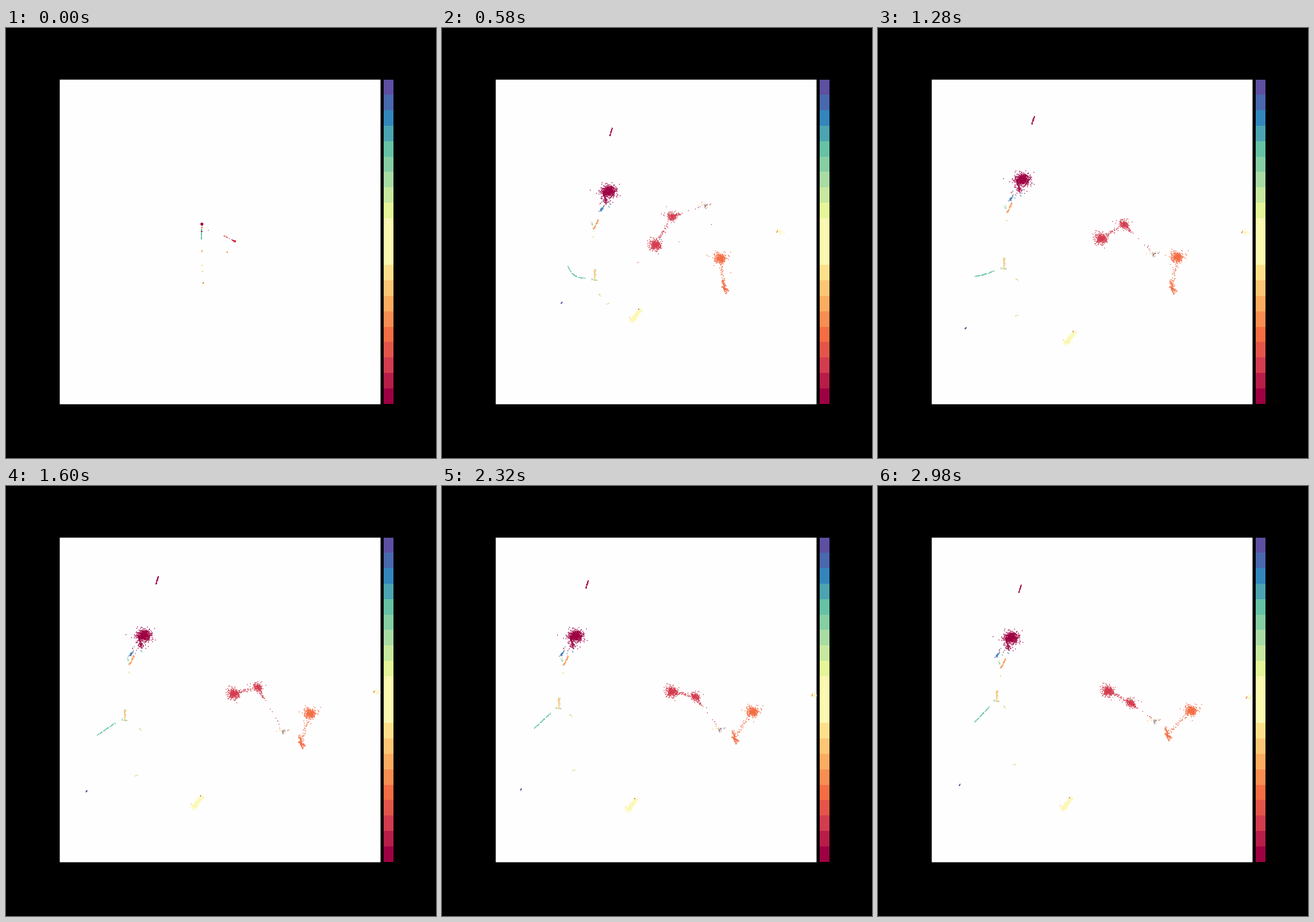
A matplotlib script for the animation above (3.03 s loop, 748x748 px).

```python
import numpy as np
import matplotlib as mpl
import matplotlib.pyplot as plt
from matplotlib.animation import FuncAnimation
from matplotlib.colors import ListedColormap

SIZE, DPI = 748, 100
LOOP, TICK, STEP = 3030, 10, 20
DOT = 1.4  # pixels
TIMES = np.array([0, 580, 1600, 2980], float)  # seed, burst, turn, rest
GROW = np.array([0.08, 1, 1, 1])[:, None, None]
TENSION = 0.6

palette = mpl.colormaps["Spectral"](np.linspace(0, 1, 21))
palette[9:12, :3] = np.array([251, 248, 176]) / 255
CRIMSON, RED, ORANGE, AMBER, SAND, LEMON = 0, 2, 4, 6, 7, 10
LIME, GREEN, TEAL, BLUE, NAVY = 13, 14, 16, 18, 20

rng = np.random.default_rng(11)
clouds, shades = [], []


def path(*stops):
    return np.array(stops, float)


def add(points, colors):
    clouds.append(points)
    shades.append(rng.choice(colors, points.shape[1]))


def blob(colors, n, spread, centre):
    add(centre[:, None] + GROW * rng.normal(0, 1, (n, 2)) * spread, colors)


def ball(color, n, spread, centre):
    """A dense blob with a thin halo."""
    blob([color], n, spread, centre)
    blob([color], n // 9, np.multiply(spread, 1.7), centre)


def strand(colors, n, spread, a, b, bow=0):
    """Points strewn along a moving line, bent sideways by bow after the burst."""
    t = rng.random((n, 1))
    chord = (b - a)[:, None]
    normal = chord[..., ::-1] * [-1, 1] / (np.linalg.norm(chord, axis=2)[..., None] + 1e-6)
    bend = bow * (TIMES == TIMES[1])[:, None, None] * 4 * t * (1 - t)
    noise = GROW * rng.normal(0, spread, (n, 2))
    add(a[:, None] + chord * t + normal * bend + noise, colors)


def stick(colors, n, spread, centre, half):
    """A strand of fixed direction."""
    reach = GROW[:, 0] * half
    strand(colors, n, spread, centre - reach, centre + reach)


# dark crimson group with the strands hanging below it
crimson = path((341, 341), (290, 284), (240, 260), (232, 264))
streak = path((340, 340), (294, 181), (263, 164), (247, 179))
blue = path((340, 351), (278, 315), (218, 292), (208, 294))
amber = path((341, 347), (268, 342), (219, 303), (218, 309))
ball(CRIMSON, 520, (6, 4.6), crimson)
stick([CRIMSON], 80, 2, crimson + GROW[:, 0] * (-7, 12), (3, 9))
stick([CRIMSON], 34, 0.3, streak, (-2, 6.5))
stick([BLUE, BLUE + 1], 26, 0.9, blue, (-4, 5))
blob([CRIMSON, RED, ORANGE, BLUE, BLUE + 1], 14, (5, 4), (crimson + blue) / 2 + [0, 8])
stick([AMBER - 1, AMBER], 38, 0.7, amber, (-4, 9))
stick([GREEN, TEAL], 11, 0.6, amber + GROW[:, 0] * (-6, 1), (3, 7))
blob([SAND], 2, 0.5, amber + GROW[:, 0] * (-5, 21))

# teal arc that straightens, with its upright post
post = path((341, 388), (266, 429), (207, 398), (207, 365))
strand([TEAL], 48, 0.3,
       path((340, 350), (219, 413), (158, 434), (168, 411)),
       path((340, 368), (252, 435), (192, 411), (195, 383)), bow=8)
stick([GREEN, TEAL, SAND], 14, 0.7, post + GROW[:, 0] * (-1, 9), (4.5, 0.5))
stick([AMBER, SAND, SAND, LIME], 40, 0.9, post, (0, 9))

# small drifters
stick([LIME, SAND], 6, 0.4, path((341, 413), (275, 465), (234, 424), (221, 385)), (1.5, 2))
blob([SAND, LIME], 5, (1.4, 0.7), path((342, 423), (289, 479), (228, 503), (238, 484)))
stick([NAVY], 9, 0.3, path((340, 366), (208, 478), (140, 531), (142, 520)), (-1.5, 2))

# pale yellow bar
bar_mid = path((343, 444), (338, 499), (334, 549), (329, 552))
stick([LEMON], 170, 1.8, bar_mid, (7, -8))
blob([LEMON], 85, (3, 2), bar_mid + GROW[:, 0] * (-6, 8))
blob([CRIMSON], 1, 0.3, bar_mid + GROW[:, 0] * (4, -9))
blob([AMBER], 1, 0.3, bar_mid + GROW[:, 0] * (-12, 5))

# red pair, linked to the mixed specks that swing down
red_a = path((398, 371), (371, 378), (396, 362), (400, 357))
red_b = path((398, 371), (400, 328), (438, 350), (439, 377))
mixed = path((380, 362), (458, 309), (482, 427), (481, 409))
ball(RED, 310, (4.5, 4.3), red_a)
ball(RED, 150, (3.9, 3.6), red_b)
strand([RED], 50, 1.8, red_a, red_b)
strand([RED], 28, 1.2, red_b, 0.75 * red_b + 0.25 * mixed)
strand([RED, CRIMSON], 6, 0.7, red_b, mixed)
blob([TEAL, BLUE, RED], 8, (2.5, 2.5), 0.8 * red_a + 0.2 * red_b)
blob([GREEN, TEAL], 5, (4, 2), red_b + GROW[:, 0] * (-1, -6))
blob([BLUE, BLUE + 1, NAVY], 12, (3, 2.4), mixed)
blob([AMBER, SAND, ORANGE, TEAL], 18, (4.2, 3), mixed)

# orange ball, leg and foot
sun = path((398, 371), (484, 401), (529, 396), (545, 391))
foot = path((398, 371), (491, 450), (513, 445), (503, 431))
ball(ORANGE, 280, (4.5, 4.2), sun)
strand([ORANGE], 45, 1.6, sun, foot)
stick([ORANGE], 60, 1.2, foot, (2.5, 11))
stick([ORANGE], 38, 0.9, foot + GROW[:, 0] * (1, 3), (6, 3))

# pale cluster sliding into the right edge
right = path((385, 390), (588, 354), (645, 358), (646, 368))
blob([LEMON], 32, (2.6, 2), right)
blob([AMBER, ORANGE, RED], 4, (1.5, 0.8), right + GROW[:, 0] * (-5, 0))

# strays flung out by the burst, then drawn back
blob([RED], 1, 0.3, path((352, 352), (469, 342), (464, 393), (459, 375)))
for home in (red_a, red_b, sun) * 2:
    stray = home.copy()
    stray[1] += rng.normal(0, 1, 2) * (28, 14)
    blob([RED, ORANGE], 1, 2, stray)

keys = np.concatenate(clouds, axis=1)
shade = np.concatenate(shades)
order = np.argsort(-shade, kind="stable")
keys, shade = keys[:, order], shade[order]
phase = rng.random((len(shade), 2))
speed = rng.uniform(3, 9, (len(shade), 2))

# slopes of a cardinal spline through the keys
gap = np.diff(TIMES)[:, None, None]
rate = np.diff(keys, axis=0) / gap
slope = np.zeros_like(keys)
slope[0] = rate[0]
slope[1:-1] = TENSION * (rate[:-1] * gap[1:] + rate[1:] * gap[:-1]) / (gap[:-1] + gap[1:])


def positions(ms):
    k = min(np.searchsorted(TIMES, ms, side="right") - 1, len(TIMES) - 2)
    h = TIMES[k + 1] - TIMES[k]
    u = (ms - TIMES[k]) / h
    v = 1 - u
    pts = (keys[k] * (1 + 2 * u) * v * v + keys[k + 1] * u * u * (3 - 2 * u)
           + h * u * v * (v * slope[k] - u * slope[k + 1]))
    s = ms / TIMES[-1]
    return pts + 1.6 * s * (1 - s) * np.sin(2 * np.pi * (speed * s + phase))


def panel(x0, y0, x1, y1):
    ax = fig.add_axes([x0 / SIZE, 1 - y1 / SIZE, (x1 - x0) / SIZE, (y1 - y0) / SIZE])
    ax.spines[:].set_visible(False)
    ax.patch.set_snap(False)
    return ax


fig = plt.figure(figsize=(SIZE / DPI, SIZE / DPI), dpi=DPI, facecolor="black")
left, right_edge, top, bottom = 93.5, 651.5, 89.8, 654.5

bar = panel(right_edge + 5, top, right_edge + 21.7, bottom)
bar.imshow(np.arange(21)[:, None], cmap=ListedColormap(palette), origin="lower",
           aspect="auto", interpolation="nearest")
bar.set(xticks=[], yticks=[], facecolor="black")

stage = panel(left, top, right_edge, bottom)
stage.set(xlim=(left, right_edge), ylim=(bottom, top), xticks=[], yticks=[],
          facecolor="#fefefe")
dots = stage.scatter(*keys[0].T, s=(DOT * 72 / DPI) ** 2, c=palette[shade],
                     marker="s", linewidths=0, snap=False)


def update(i):
    dots.set_offsets(positions(min(i * TICK // STEP * STEP, TIMES[-1])))
    return [dots]


anim = FuncAnimation(fig, update, frames=LOOP // TICK, interval=TICK,
                     repeat=True, repeat_delay=0)
plt.show()
```
